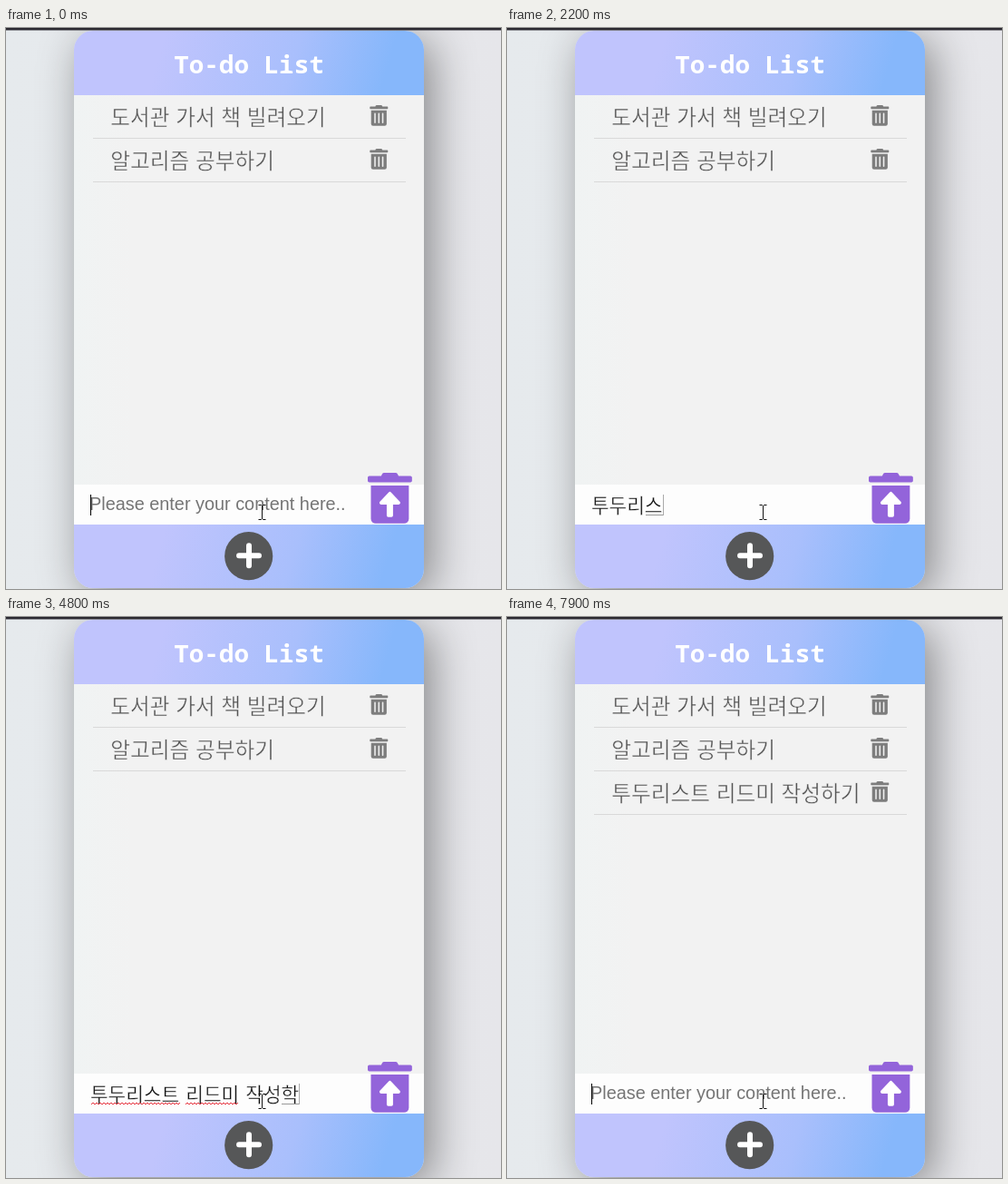
Write an HTML page that moves like this. It is 546 px wide and 618 px high and loops after 8000 ms.

```html
<!DOCTYPE html>
<html lang="ko">
<head>
<meta charset="utf-8">
<title>To-do List</title>
<style>
html, body { margin: 0; width: 100%; height: 100%; overflow: hidden; }
body { position: relative; background: linear-gradient(90deg, #e6eaed, #e6e6ea); }
.card {
  --sky: linear-gradient(106deg, #c0c4fd 25%, #a9bffc 62%, #86b7fb 88%);
  position: absolute; left: 75px; top: 3px; width: 386px; height: 614px; border-radius: 21px;
  background: var(--sky) top / 100% 71px no-repeat, var(--sky) bottom / 100% 70px no-repeat;
  box-shadow: 9px 10px 48px rgba(0, 0, 0, .42);
}
svg { position: absolute; left: 0; top: 0; }
text { white-space: pre; }
.title { font: 700 27.6px "Noto Sans Mono", monospace; fill: #fff; text-anchor: middle; }
.item text, .typed { font-family: "Noto Sans CJK KR", "Noto Sans CJK", sans-serif; font-weight: 300; }
/* A paper-coloured outline thins the strokes */
.item text { font-size: 23.65px; fill: #555; stroke: #f2f2f2; stroke-width: .45px; }
.typed { font-size: 21.33px; word-spacing: 1.2px; fill: #111; stroke: #fdfdfd; stroke-width: .4px; }
.hint { font: 19.87px "Liberation Sans", Arial, sans-serif; fill: #757575; }
</style>
</head>
<body>
<div class="card"></div>
<svg width="546" height="618" viewBox="0 0 546 618">
  <defs>
    <linearGradient id="paper">
      <stop stop-color="#f0f3f3"/>
      <stop offset=".17" stop-color="#f2f2f2"/>
    </linearGradient>
    <path id="lid" d="M432 32H312l-9.4-18.7A24 24 0 0 0 281.1 0H166.8a23.7 23.7 0 0 0-21.4 13.3L136 32H16A16 16 0 0 0 0 48v32a16 16 0 0 0 16 16h416a16 16 0 0 0 16-16V48a16 16 0 0 0-16-16z"/>
    <path id="bin" d="M32 128h384v336a48 48 0 0 1-48 48H80a48 48 0 0 1-48-48z"/>
    <g id="trash" fill="#7d7d7d">
      <use href="#lid"/><use href="#bin"/>
      <path d="M128 208v224M224 208v224M320 208v224" stroke="#f2f2f2" stroke-width="34" stroke-linecap="round"/>
    </g>
  </defs>
  <rect width="546" height="2.5" fill="#2b2930"/>
  <text class="title" x="268" y="49.5">To-do List</text>
  <rect x="75" y="74" width="386" height="473" fill="url(#paper)"/>
  <rect x="75" y="503" width="386" height="44" fill="#fdfdfd"/>
  <g id="list"></g>

  <text class="hint" id="hint" x="92" y="531">Please enter your content here..</text>
  <text class="typed" id="typed" x="93" y="533.5"></text>
  <path id="compose" stroke="#999"/>
  <path id="wave1" fill="none" stroke="#e5303c"/>
  <path id="wave2" fill="none" stroke="#e5303c"/>
  <path id="caret"/>

  <g transform="translate(399 490) scale(.109)" fill="#9364da">
    <use href="#lid"/><use href="#bin"/>
    <path fill="#fff" d="M123.3 291.2l89.4-94.3a15.4 15.4 0 0 1 22.6 0l89.4 94.3c10 10.6 2.9 28.8-11.4 28.8H256v112a16 16 0 0 1-16 16h-32a16 16 0 0 1-16-16V320h-57.4c-14.2 0-21.4-18.2-11.3-28.8z"/>
  </g>
  <circle cx="267.7" cy="581.7" r="26.6" fill="#565758"/>
  <path d="M257 581.2h22M268 570.2v22" stroke="#fff" stroke-width="6" stroke-linecap="round"/>
  <path d="M278.5 525.5h3l1 1 1-1h3M282.5 526v15M278.5 541.5h3l1-1 1 1h3" fill="none" stroke="#111"/>
</svg>
<script>
const $ = id => document.getElementById(id);
const LOOP = 8000, START = 850, SUBMIT = 6450;
const items = ['도서관 가서 책 빌려오기', '알고리즘 공부하기', '투두리스트 리드미 작성하기'];

$('list').innerHTML = items.map((label, i) => `
  <g class="item" transform="translate(0 ${i * 48})">
    <text x="115.3" y="107">${label}</text>
    <use href="#trash" transform="translate(401.3 85) scale(.0446)"/>
    <path d="M96 121.5H441" stroke="#d9d9d9"/>
  </g>`).join('');
const newItem = $('list').lastElementChild;

// Each keystroke as the input method composes it
const words = [
  ['', 'ㅌ,투,툳,투두,투둘,투두리,투두릿,투두리스,투두리슽,투두리스트'],
  ['투두리스트 ', ',ㄹ,리,릳,리드,리듬,리드미'],
  ['투두리스트 리드미 ', ',ㅈ,자,작,잓,작서,작성,작성ㅎ,작성하,작성학,작성하기']
];
const keys = words.flatMap(([done, steps]) => steps.split(',').map(s => done + s));

function keyIndex(t) {
  if (t < 2150) return Math.floor((t - START) / 180);
  return Math.min(keys.length - 1, 7 + Math.floor((t - 2110) / 140));
}

function zigzag(from, to) {
  let d = `M${from} 537`;
  for (let x = from + 2, up = true; x <= to; x += 2, up = !up) d += `L${x} ${up ? 535 : 537}`;
  return d;
}
$('wave1').setAttribute('d', zigzag(94, 192));
$('wave2').setAttribute('d', zigzag(198, 257));

const show = (el, on) => el.setAttribute('visibility', on ? 'visible' : 'hidden');

function draw(t) {
  const typing = t >= START && t < SUBMIT;
  const text = typing ? keys[keyIndex(t)] : '';
  const typed = $('typed');
  if (typed.textContent !== text) typed.textContent = text;
  show($('hint'), !typing);
  show(newItem, t >= SUBMIT);
  show($('wave1'), text.length > 5);
  show($('wave2'), text.length > 9);

  const end = text ? Math.round(93 + typed.getComputedTextLength()) : 93;
  const composing = typing && !text.endsWith(' ') && t < 5500;
  show($('compose'), composing);
  $('compose').setAttribute('d', `M${end - 19} 536.5H${end}`);

  const blink = (t < START ? t : t - SUBMIT) % 1000 < 500;
  show($('caret'), typing || blink);
  $('caret').setAttribute('stroke', typing ? '#aaa' : '#000');
  $('caret').setAttribute('d', `M${end + .5} 514V537`);
}

function frame() {
  draw(performance.now() % LOOP);
  requestAnimationFrame(frame);
}
frame();
</script>
</body>
</html>
```
